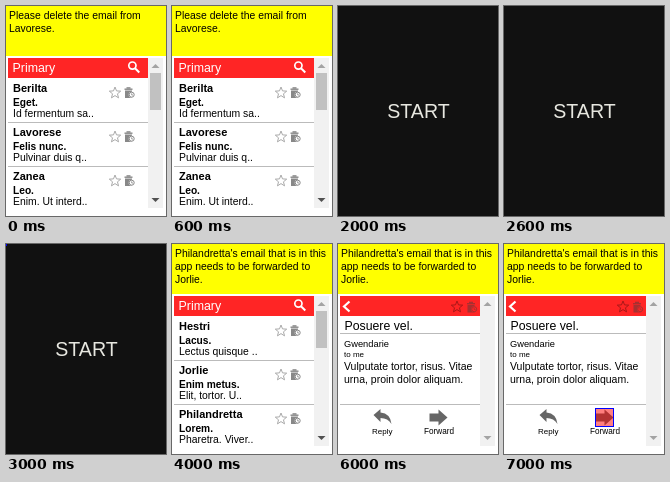
Animation, 160 px wide and 210 px high, one loop 8 s. Source, as an HTML page with a canvas:

```html
<!DOCTYPE html>
<html lang="en">
<head>
<meta charset="utf-8">
<title>Mail tasks</title>
<style>
html, body { margin: 0; width: 100%; height: 100%; overflow: hidden; background: #fff; }
canvas { display: block; width: 160px; height: 210px; }
</style>
</head>
<body>
<canvas id="stage"></canvas>
<script>
const canvas = document.getElementById('stage');
const ratio = window.devicePixelRatio || 1;
canvas.width = 160 * ratio;
canvas.height = 210 * ratio;
const ctx = canvas.getContext('2d', { alpha: false });
const FONT = '"Liberation Sans", Arial, sans-serif';
const RED = '#ff2525';
const LOOP = 8000;

const deleteTask = {
  lines: ['Please delete the email from', 'Lavorese.'],
  mails: [
    ['Berilta', 'Eget.', 'Id fermentum sa..'],
    ['Lavorese', 'Felis nunc.', 'Pulvinar duis q..'],
    ['Zanea', 'Leo.', 'Enim. Ut interd..']
  ]
};
const forwardTask = {
  lines: ["Philandretta's email that is in this", 'app needs to be forwarded to', 'Jorlie.'],
  mails: [
    ['Hestri', 'Lacus.', 'Lectus quisque ..'],
    ['Jorlie', 'Enim metus.', 'Elit, tortor. U..'],
    ['Philandretta', 'Lorem.', 'Pharetra. Viver..']
  ]
};

function rect(x, y, w, h, color) {
  ctx.fillStyle = color;
  ctx.fillRect(x, y, w, h);
}

function text(str, x, y, size = 10.4, weight = 'normal', color = '#000') {
  ctx.font = `${weight} ${size}px ${FONT}`;
  ctx.fillStyle = color;
  ctx.fillText(str, x, y);
}

function path(points, close) {
  ctx.beginPath();
  points.forEach(([x, y]) => ctx.lineTo(x, y));
  if (close) ctx.closePath();
}

function fillPath(points, color) {
  path(points, true);
  ctx.fillStyle = color;
  ctx.fill();
}

function strokePath(points, color, width, close = false) {
  path(points, close);
  ctx.strokeStyle = color;
  ctx.lineWidth = width;
  ctx.stroke();
}

function ring(x, y, r, color, width) {
  ctx.beginPath();
  ctx.arc(x, y, r, 0, Math.PI * 2);
  ctx.strokeStyle = color;
  ctx.lineWidth = width;
  ctx.stroke();
}

function star(x, y, color) {
  const points = Array.from({ length: 10 }, (_, i) => {
    const a = i * Math.PI / 5 - Math.PI / 2;
    const r = i % 2 ? 2.6 : 6;
    return [x + r * Math.cos(a), y + r * Math.sin(a)];
  });
  strokePath(points, color, 1, true);
}

function trash(x, y, color, back) {
  rect(x - 5, y - 4, 8, 1.4, color);
  rect(x - 3, y - 5.3, 4, 1.5, color);
  rect(x - 4.5, y - 2, 7, 7.5, color);
  ctx.beginPath();
  ctx.arc(x + 2.2, y + 2.2, 3, 0, Math.PI * 2);
  ctx.fillStyle = back;
  ctx.fill();
  ring(x + 2.2, y + 2.2, 2.5, color, 1);
  strokePath([[x + 2.2, y + 0.8], [x + 2.2, y + 2.5], [x + 3.5, y + 2.5]], color, 0.8);
}

function search() {
  ring(126.4, 59.6, 3.6, '#fff', 1.7);
  strokePath([[129, 62.2], [133.3, 66.5]], '#fff', 2);
}

// Curved arrow; dir -1 points left, 1 points right.
function replyArrow(x, y) {
  ctx.beginPath();
  ctx.moveTo(x - 9, y - 2);
  ctx.lineTo(x - 2, y - 8);
  ctx.lineTo(x - 2, y - 4.5);
  ctx.quadraticCurveTo(x + 8, y - 3.5, x + 9, y + 7);
  ctx.quadraticCurveTo(x + 5.5, y + 1, x - 2, y + 1);
  ctx.lineTo(x - 2, y + 5);
  ctx.closePath();
  ctx.fillStyle = '#666';
  ctx.fill();
}

function forwardArrow(x, y) {
  fillPath([[x - 9, y - 4], [x, y - 4], [x, y - 8], [x + 9, y],
    [x, y + 8], [x, y + 4], [x - 9, y + 4]], '#666');
}

function mark(x, y, size) {
  rect(x, y, size, size, 'rgba(255,0,0,.5)');
  ctx.strokeStyle = '#00f';
  ctx.lineWidth = 1;
  ctx.strokeRect(x + 0.5, y + 0.5, size - 1, size - 1);
}

function scrollbar(active) {
  rect(142, 52, 15, 150, '#f1f1f1');
  fillPath([[145.5, 62], [149.5, 58], [153.5, 62]], '#a3a3a3');
  fillPath([[145.5, 192], [149.5, 196], [153.5, 192]], active ? '#505050' : '#a3a3a3');
  if (active) rect(144, 67, 11, 37, '#c1c1c1');
}

function frame(task, scrolls) {
  rect(0, 0, 160, 210, '#fff');
  rect(0, 0, 160, 50, '#ff0');
  task.lines.forEach((line, i) => text(line, 3, 13 + 13 * i));
  rect(2, 52, 140, 20, RED);
  scrollbar(scrolls);
}

function inbox(task) {
  frame(task, true);
  text('Primary', 6.5, 66, 12.4, 'normal', '#fff');
  search();
  task.mails.forEach(([name, subject, body], i) => {
    const y = 72 + 44 * i;
    text(name, 7, y + 14, 11, 'bold');
    text(subject, 7, y + 28, 10.2, 'bold');
    text(body, 7, y + 39);
    star(109, y + 15, '#aaa');
    trash(123.5, y + 14.5, '#888', '#fff');
    if (i < 2) rect(2, y + 44, 140, 1, '#bbb');
  });
}

function message() {
  frame(forwardTask, false);
  strokePath([[11.5, 57.5], [6, 62.5], [11.5, 67.5]], '#fff', 2.2);
  star(119, 63, '#a81818');
  trash(134, 63, '#a83030', RED);
  text('Posuere vel.', 6.5, 86, 12.3);
  rect(2, 89, 140, 1, '#bbb');
  text('Gwendarie', 6, 103, 9.3);
  text('to me', 6, 113, 8);
  text('Vulputate tortor, risus. Vitae', 6, 126, 10.5);
  text('urna, proin dolor aliquam.', 6, 139, 10.5);
  rect(2, 160, 140, 1, '#bbb');
  replyArrow(44.5, 173);
  forwardArrow(100.5, 173.5);
  text('Reply', 34, 190, 8);
  text('Forward', 86, 190, 8.2);
}

function cover() {
  rect(0, 0, 160, 210, '#111');
  ctx.textAlign = 'center';
  text('START', 80.5, 112, 19.6, 'normal', '#e7e7e0');
  ctx.textAlign = 'left';
}

function draw(t) {
  ctx.setTransform(ratio, 0, 0, ratio, 0, 0);
  if (t < 2000) {
    inbox(deleteTask);
    if (t >= 1000) mark(117, 124, 13);
  } else if (t < 4000) {
    cover();
    if (t >= 3000) rect(0, 0, 1, 2, '#00f');
  } else if (t < 6000) {
    inbox(forwardTask);
  } else {
    message();
    if (t >= 7000) mark(91, 164, 19);
  }
}

const start = performance.now();
function tick() {
  draw((performance.now() - start) % LOOP);
  requestAnimationFrame(tick);
}
tick();
</script>
</body>
</html>
```
